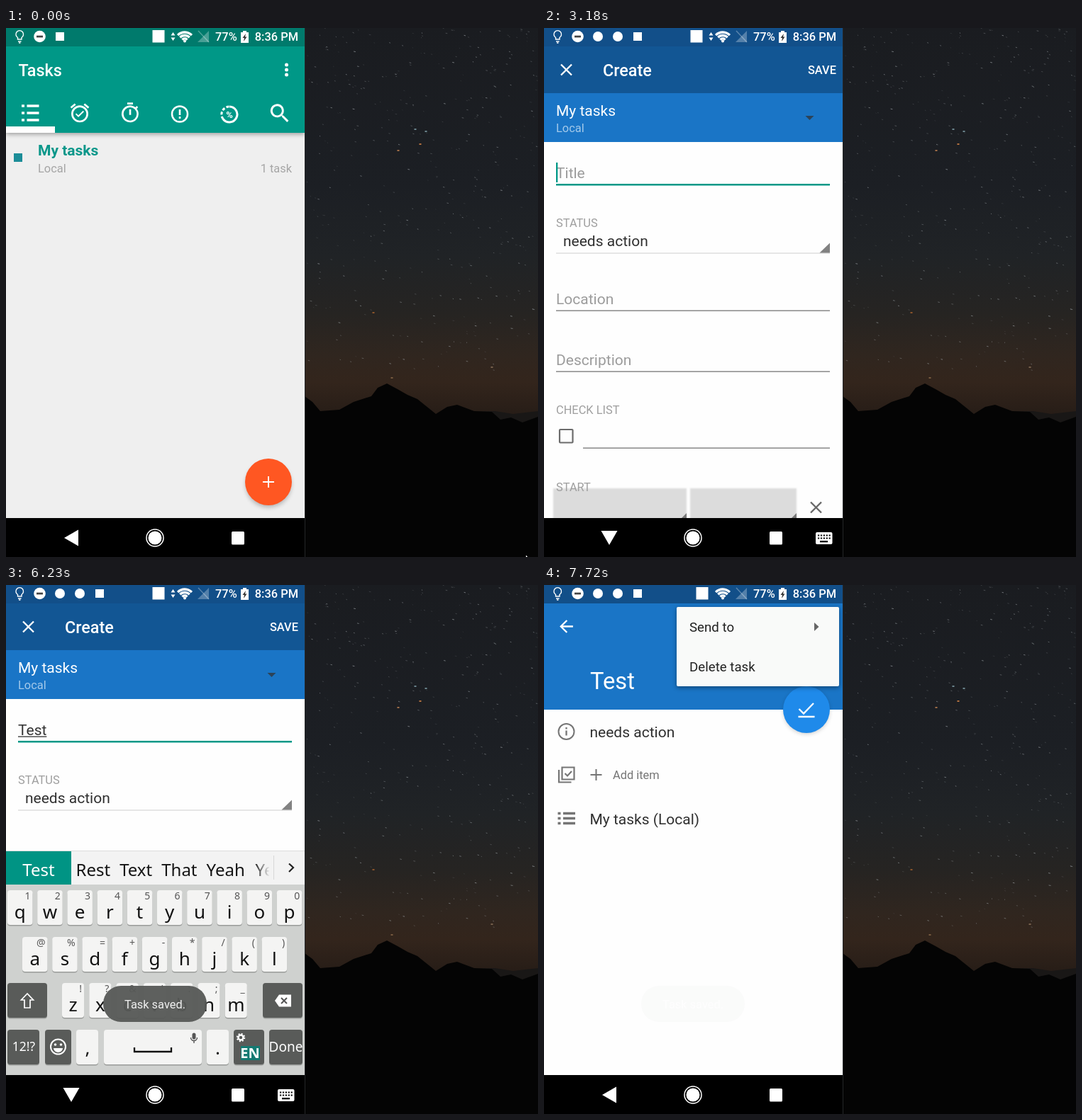
Recreate the animation shown at these times as an HTML page. Size 750x747 px, loop 8000 ms.

```html
<!DOCTYPE html>
<html lang="en">
<head>
<meta charset="utf-8">
<title>Creating a task</title>
<style>
html, body { margin: 0; height: 100%; overflow: hidden; background: #000; }
svg { display: block; width: 100vw; height: 100vh; }
text { font-family: Roboto, sans-serif; white-space: pre; }
.key text, #strip text { font-family: "Noto Sans", "Open Sans", sans-serif; }
.upper .letter { text-transform: uppercase; }
</style>
</head>
<body>
<svg id="stage" viewBox="0 0 750 747" preserveAspectRatio="none"></svg>
<script>
const LOOP = 8000, BLUE = '#1a75c6', TEAL = '#009887', GREY = '#757575';

// Drawing helpers; text is placed by the middle of its capitals.
const rect = (x, y, w, h, fill, more = '') =>
  `<rect x="${x}" y="${y}" width="${w}" height="${h}" fill="${fill}" ${more}/>`;
const circle = (x, y, r, fill, more = '') =>
  `<circle cx="${x}" cy="${y}" r="${r}" fill="${fill}" ${more}/>`;
const text = (x, y, s, size, fill, more = '') =>
  `<text x="${x}" y="${y + .356 * size}" font-size="${size}" fill="${fill}" ${more}>${s}</text>`;
const shape = (d, fill, more = '') => `<path d="${d}" fill="${fill}" ${more}/>`;
const line = (d, color, width = 2, more = '') =>
  `<path d="${d}" fill="none" stroke="${color}" stroke-width="${width}" ${more}/>`;
const group = (id, content, more = '') => `<g id="${id}" ${more}>${content}</g>`;
const icon = (x, y, scale, d, fill = '#fff') =>
  shape(d, fill, `transform="translate(${x} ${y}) scale(${scale}) translate(-12 -12)"`);
const MEDIUM = 'font-weight="500" ', BOLD = 'font-weight="700" ', MID = 'text-anchor="middle" ', END = 'text-anchor="end" ';

const cross = (x, y, r, color) =>
  line(`M${x - r} ${y - r}l${2 * r} ${2 * r}m0 ${-2 * r}l${-2 * r} ${2 * r}`, color, 2.3);
const plus = (x, y, r, color, w = 2) => line(`M${x - r} ${y}h${2 * r}M${x} ${y - r}v${2 * r}`, color, w);
const dots = (x, y) => [-7, 0, 7].map(d => circle(x, y + d, 2.5, '#fff')).join('');
const bullets = (x, y, gap, color) => [-gap, 0, gap].map(d =>
  line(`M${x - 12} ${y + d}h4m3.5 0h17`, color, 3.5)).join('');

const ICONS = {
  alarm: 'M22 5.7l-4.6-3.9-1.3 1.6 4.6 3.9zM7.9 3.4L6.6 1.9 2 5.7l1.3 1.5zM12 4a9 9 0 1 0 0 18a9 9 0 1 0 0-18zm0 16a7 7 0 1 1 0-14a7 7 0 1 1 0 14zm-1.5-5.5L8.4 12.4l-1 1 3.1 3.2 6-6-1-1z',
  timer: 'M15 1H9v2h6zM11 14h2V8h-2zM19 7.4L20.45 6 19 4.56 17.62 6A9 9 0 1 0 19 7.4zM12 20a7 7 0 1 1 0-14a7 7 0 1 1 0 14z',
  search: 'M15.5 14h-.8l-.3-.3A6.5 6.5 0 1 0 13.7 14.4l.3.3v.8l5 5L20.5 19zM9.5 14a4.5 4.5 0 1 1 0-9a4.5 4.5 0 1 1 0 9z',
  back: 'M20 11H7.83l5.59-5.59L12 4l-8 8 8 8 1.41-1.41L7.83 13H20z',
  pin: 'M16 12V4h1V2H7v2h1v8l-2 2v2h5.2v6h1.6v-6H18v-2z',
  pencil: 'M3 17.25V21h3.75L17.81 9.94l-3.75-3.75zM20.71 7.04a1 1 0 0 0 0-1.41l-2.34-2.34a1 1 0 0 0-1.41 0l-1.83 1.83 3.75 3.75z'
};

function sky() {
  let seed = 7, stars = '';
  const rnd = () => (seed = seed * 16807 % 2147483647) / 2147483647;
  for (let i = 0; i < 400; i++) {
    const x = 424 + rnd() * 325, y = 490 * rnd() ** 1.25;
    stars += line(`M${x.toFixed(1)} ${y.toFixed(1)}l${(1 + rnd() * 1.8).toFixed(1)} .6`,
      '#aab0b4', 1, `opacity="${(.12 + .5 * rnd() ** 2).toFixed(2)}"`);
  }
  const bright = [[584, 164, '#d98546'], [553, 173, '#c08050'], [577, 143, '#7f9fa8'], [592, 146, '#7f9fa8'],
    [518, 402, '#a5602c'], [544, 494, '#8a6848'], [685, 479, '#8a7058']];
  return rect(421, 0, 329, 747, 'url(#night)') + stars +
    bright.map(([x, y, c]) => line(`M${x - 1.5} ${y}h3`, c, 1.6)).join('') +
    shape('M640 542L690 541 715 545 750 541V570H640z', '#191716') +
    shape('M421 520L432 528 443 541 470 539 490 528 515 520 524 508 537 502 552 510 566 518 580 524 606 545 ' +
      '622 535 636 532 660 541 685 542 697 553 712 550 728 557 750 549V747H421z', '#040404') +
    rect(421, 0, 1, 747, '#242628');
}

function statusIcons() {
  const wifi = [14, 9.5, 5].map(r => {
    const d = r * .707;
    return line(`M${252 - d} ${20 - d}A${r} ${r} 0 0 1 ${252 + d} ${20 - d}`, '#fff', 3.3);
  }).join('');
  return line('M16.5 16v-2.5a5.3 5.3 0 1 1 5.5 0V16zM17 19h4.5M18 21h2.5', '#fff', 1.4) +
    circle(47.5, 12, 8.3, '#fff') + rect(43, 10.7, 9, 2.7, '#444') +
    group('notices', circle(76, 12, 7, '#fff') + circle(104, 12, 7, '#fff')) +
    group('plug', rect(70, 6, 12, 12, '#fff')) +
    group('chip', rect(206.5, 3, 17, 17.5, '#fff')) +
    group('arrows', shape('M232.5 10.5h6l-3-4.5zM232.5 13.5h6l-3 4.5z', '#fff')) +
    wifi + circle(252, 18.5, 2, '#fff') +
    shape('M286 4V20H270z', '#fff', 'opacity=".28"') + line('M271 4l15 16', '#fff', 1.5, 'opacity=".3"') +
    text(295, 12.5, '77%', 16.4, '#fff', MEDIUM) +
    shape('M331 6h3V4h5v2h3v15h-11z', '#fff') + shape('M338 8l-4.5 6h2.5l-1 5 4.5-6.5h-2.5z', '#333') +
    text(412, 12.5, '8:36 PM', 16.4, '#fff', MEDIUM + END);
}

function listScreen() {
  return rect(0, 26, 421, 666, '#efefef') +
    rect(0, 140, 421, 10, '#000', 'opacity=".35" filter="url(#soft)"') +
    rect(0, 26, 421, 122, TEAL) + rect(0, 139, 69, 9, '#fff') +
    text(17.5, 60, 'Tasks', 23.4, '#fff', MEDIUM) + dots(395.5, 59) +
    bullets(34, 120, 10, '#fff') +
    icon(104, 120, 1.33, ICONS.alarm) + icon(175, 120, 1.33, ICONS.timer) +
    circle(245, 121.5, 11, 'none', 'stroke="#fff" stroke-width="2.5"') +
    line('M245 115v8m0 2v3', '#fff', 2.6) +
    line('M315 111a11 11 0 1 1-9 17.5', '#fff', 3) +
    line('M306 128.5a11 11 0 0 1 9-17.5', '#fff', 3, 'stroke-dasharray="4 2.5"') +
    text(315, 122, '%', 13, '#fff', BOLD + MID) +
    icon(386, 120.5, 1.46, ICONS.search) +
    rect(11, 177, 12, 12, '#1c8d98') +
    text(45, 173, 'My tasks', 21, '#0b978a', BOLD) +
    text(45, 198, 'Local', 16.4, '#a5a5a5') + text(403, 198, '1 task', 16.4, '#a5a5a5', END) +
    circle(370, 645, 32, '#000', 'opacity=".25" filter="url(#soft)"') +
    circle(370, 641, 33, '#ff5722') + circle(370, 641, 33, '#fff', 'id="ripple"') +
    plus(370, 641, 8, '#fff', 1.8);
}

function createScreen() {
  const field = (label, y) => text(17, y, label, 21, '#9c9c9c') + rect(17, y + 15.5, 386, 1.3, '#777');
  const caption = (label, y) => text(17, y, label, 16.4, '#9f9f9f');
  return rect(0, 26, 421, 700, '#fefefe') + rect(0, 26, 421, 66, '#bcbebc') +
    group('tint',
      rect(0, 26, 421, 66, '#125694') + rect(0, 92, 421, 69, BLUE) +
      rect(363, 31, 58, 56, '#fff', 'id="savePress"') +
      text(17, 116.5, 'My tasks', 21, '#fff') + text(17, 141.5, 'Local', 16.4, '#a3c9ea') +
      text(412, 59.5, 'SAVE', 16.4, '#fff', MEDIUM + END)) +
    cross(31.5, 59, 7.5, '#fff') + text(83, 60, 'Create', 23.4, '#fff', MEDIUM) +
    shape('M368.5 124h12l-6 6z', '#333', 'opacity=".75"') +
    text(17, 205, 'Title', 21, '#9c9c9c', 'id="hint"') +
    text(17, 205, '', 21, '#333', 'id="title"') + rect(17, 213.5, 0, 1.3, '#333', 'id="compose"') +
    rect(17, 190, 2.3, 28, TEAL, 'id="caret"') + rect(17, 220, 386, 2.5, TEAL) +
    caption('STATUS', 275.5) + text(27, 300.5, 'needs action', 21, '#303030') +
    rect(17, 317.5, 386, 1, '#d0d0d0') + shape('M388.5 317.5L403 303.5V317.5z', '#828282') +
    field('Location', 383) + field('Description', 469) + caption('CHECK LIST', 539.5) +
    rect(22, 567, 18.5, 18.5, 'none', 'stroke="#6b6b6b" stroke-width="2.2" rx="1"') +
    rect(55, 592.5, 348, 1.3, '#777') +
    [[13, 188], [206, 150]].map(([x, w]) =>
      rect(x, 650, w, 60, '#dcdcdc', 'filter="url(#slight)"') +
      shape(`M${x + w - 7} 692h7v-7z`, '#777')).join('') +
    caption('START', 648) + cross(383.5, 677, 7.5, '#666');
}

function detailScreen() {
  return rect(0, 26, 421, 700, '#fefefe') + rect(0, 26, 421, 150, BLUE) +
    icon(31.5, 58.5, 1.17, ICONS.back) + icon(290, 58, 1.17, ICONS.pin) +
    icon(346, 59, 1.3, ICONS.pencil) + dots(395.5, 59) +
    text(65, 135.5, 'Test', 32.7, '#fff') +
    circle(370, 178, 32, '#000', 'opacity=".22" filter="url(#soft)"') + circle(370, 176, 33, '#1f8aea') +
    line('M359.5 175l6.5 6.5L380 167M358.5 186h23', '#fff', 2.3) +
    circle(31.5, 207, 11, 'none', `stroke="${GREY}" stroke-width="2"`) +
    line('M31.5 201v2.5m0 2v7', GREY, 2.3) +
    line('M21 261v17.500h17.500M25.500 257.500h17v17h-17zM29.500 266l3.500 3.500 6-6.500', GREY, 2.2) +
    bullets(31.5, 329.5, 7, GREY) +
    text(64.5, 208, 'needs action', 21, '#303030') +
    plus(73.5, 268, 8, GREY) + text(97, 268.5, 'Add item', 16.4, '#757575') +
    text(64.5, 330.5, 'My tasks (Local)', 21, '#303030');
}

function keyboard() {
  const key = (x, y, w, content, dark) => `<g class="key">` +
    rect(x, y + 2, w, 48.5, '#9a9c9a', 'rx="4"') +
    rect(x, y, w, 49, dark ? '#595b59' : '#f4f4f3', 'rx="4"') + content + '</g>';
  const row = (letters, hints, x0, y, pitch, w) => [...letters].map((c, i) => {
    const x = x0 + i * pitch;
    return key(x, y, w,
      rect(x, y, w, 49, '#000', `rx="4" id="press-${c}" opacity="0"`) +
      `<text class="letter" x="${x + w / 2}" y="${y + 40}" font-size="26" fill="#111" ${MID}>${c}</text>` +
      text(x + w - 3, y + 8.5, hints[i].replace('&', '&amp;'), 14, '#555', END));
  }).join('');
  const label = (x, y, s, size, more = '') => text(x, y, s, size, '#fff', MID + more);
  return rect(0, 375, 421, 318, '#cfd1cf') + rect(0, 375, 421, 48, '#f3f3f3') + rect(0, 375, 421, 1, '#ddd') +
    group('strip', rect(0, 376, 92, 47, '#009484', 'id="cell"') +
      text(46, 402, '', 24, '#fff', MID + 'id="word"') + text(99, 402, '', 24, '#151515', 'id="others"')) +
    rect(350, 377, 22, 45, 'url(#fade)') + rect(371, 377, 50, 45, '#f3f3f3') +
    rect(377, 382, 1, 34, '#d8d8d8') + line('M399 393.5l6 5.5-6 6', '#222', 2.2) +
    row('qwertyuiop', '1234567890', 2, 431, 42.2, 35.5) +
    row('asdfghjkl', '@%=+-*/()', 23, 497, 42.2, 35.5) +
    row('zxcvbnm', "!?&':;_", 79, 562, 38.3, 31) +
    key(2, 562, 56, line('M30 577l-8.5 9h4.5v11h8v-11h4.5z', '#fff', 1.7), 1) +
    key(362, 562, 56, shape('M379 587l6-8.5h17v17h-17z', '#fff') + line('M388 583l8 8m0-8l-8 8', '#555', 2), 1) +
    key(2, 628, 45, label(25, 652, '12!?', 17.5), 1) +
    key(55, 628, 37, circle(73.5, 652, 10.5, 'none', 'stroke="#fff" stroke-width="2"') +
      circle(69.5, 649, 1.8, '#fff') + circle(77.5, 649, 1.8, '#fff') + shape('M67 654h13a6.5 6 0 0 1-13 0z', '#fff'), 1) +
    key(99, 628, 31, text(115, 653.5, ',', 26, '#111', MID)) +
    key(138, 628, 138, line('M181 653v6h52v-6', '#111', 2.3) +
      line('M265 635v4', '#555', 5, 'stroke-linecap="round"') + line('M260.5 639a4.5 4.5 0 0 0 9 0M265 643v4', '#555', 1.4)) +
    key(283, 628, 31, text(298.5, 653.5, '.', 26, '#111', MID)) +
    key(321, 628, 43, rect(331, 651, 27, 20, '#147a72') + label(344, 661, 'EN', 20, 'font-weight="600"') +
      circle(331, 639, 3.5, 'none', 'stroke="#fff" stroke-width="2.5"') +
      circle(331, 639, 5.2, 'none', 'stroke="#fff" stroke-width="2" stroke-dasharray="2 2.08"'), 1) +
    key(371, 628, 47, label(394.5, 652.5, 'Done', 19), 1);
}

const menu = rect(187, 33, 229, 112, '#000', 'opacity=".4" filter="url(#soft)"') +
  rect(187, 31, 229, 112, '#f9faf9', 'rx="2"') +
  text(205, 59.5, 'Send to', 18.7, '#222') + text(205, 115.5, 'Delete task', 18.7, '#222') +
  shape('M381 53l6.5 6-6.5 6z', '#666');
const toast = rect(137, 566, 146, 51, '#575957', 'rx="25" opacity=".95"') +
  text(210, 592, 'Task saved.', 16.4, '#f0f0f0', MID);
const navBar = rect(0, 692, 421, 55, '#000') +
  shape('M82 720l20-11.5v23z', '#fff', 'id="backKey"') +
  circle(210, 720, 9.5, '#fff') + circle(210, 720, 12, 'none', 'stroke="#fff" stroke-width="1.5"') +
  rect(318, 711, 18, 18.5, '#fff', 'rx="1.5"') +
  group('keysKey', rect(383, 712, 23.5, 17, '#fff', 'rx="2"') +
    line('M386 716.5h18M386 720.5h18', '#000', 2.2, 'stroke-dasharray="2.2 1.7"') + rect(389, 724, 11, 2.3, '#000'));

const stops = [[0, '#1a1c20'], [.3, '#1c1f24'], [.43, '#202326'], [.54, '#262422'], [.62, '#30261f'], [.67, '#33251c'], [.73, '#271d17']];
stage.innerHTML = `<defs>
  <linearGradient id="night" x2="0" y2="1">${stops.map(([o, c]) => `<stop offset="${o}" stop-color="${c}"/>`).join('')}</linearGradient>
  <linearGradient id="fade"><stop stop-color="#f3f3f3" stop-opacity="0"/><stop offset="1" stop-color="#f3f3f3"/></linearGradient>
  <filter id="soft" x="-20%" y="-100%" width="140%" height="300%"><feGaussianBlur stdDeviation="3"/></filter>
  <filter id="slight"><feGaussianBlur stdDeviation="1"/></filter></defs>` +
  group('list', listScreen()) + group('create', createScreen()) + group('detail', detailScreen()) +
  rect(0, 0, 421, 26, '#007a6c') + rect(0, 0, 421, 26, '#afb1af', 'id="greyBar"') + rect(0, 0, 421, 26, '#124f89', 'id="blueBar"') +
  statusIcons() + group('keyboard', keyboard()) + group('menu', menu) + group('toast', toast) + navBar + sky() +
  shape('M733 744.5l2.5 2.5h-2.5z', '#fff', 'id="pointer"');

const $ = id => document.getElementById(id);
const set = (id, name, value) => $(id).setAttribute(name, value);
const alpha = (id, a) => { set(id, 'opacity', a); set(id, 'visibility', +a ? 'visible' : 'hidden'); };
const move = (id, x, y) => set(id, 'transform', `translate(${x} ${y})`);
const span = (t, a, b) => Math.min(1, Math.max(0, (t - a) / (b - a)));
const easeOut = p => 1 - (1 - p) ** 3;

// Each keystroke: time, key, text so far, other suggestions.
const strokes = [
  [4000, 't', 'T', 'The Test To That Thank'],
  [4530, 'e', 'Te', 'Test The Text Tell Yes'],
  [4770, 's', 'Tes', 'Test Yes Rest Text Tell'],
  [4980, 't', 'Test', 'Rest Text That Yeah Yes']
];
let shown = null;

// Words are centred in padded cells that have a minimum width.
function suggest(words) {
  $('others').innerHTML = words.split(' ').map(w => `<tspan>${w}</tspan>`).join('');
  let left = 92;
  const widths = [...$('others').children].map(w => w.getComputedTextLength());
  widths.forEach((width, i) => {
    const cell = Math.max(54, width + 13);
    $('others').children[i].setAttribute('x', left + (cell - width) / 2);
    left += cell;
  });
}

function type(t) {
  const done = strokes.filter(s => t >= s[0]);
  const [, , word, others] = done[done.length - 1] || [0, '', '', ''];
  for (const c of 'tes')
    set('press-' + c, 'opacity', strokes.some(s => s[1] === c && t >= s[0] - 70 && t < s[0] + 70) ? .18 : 0);
  if (word === shown) return;
  shown = word;
  $('title').textContent = $('word').textContent = word;
  suggest(others);
  const width = word ? $('title').getComputedTextLength() : 0;
  set('compose', 'width', width);
  set('caret', 'x', 17 + width);
  alpha('cell', word ? 1 : 0);
  set('hint', 'opacity', word ? 0 : 1);
  set('keyboard', 'class', word ? '' : 'upper');
}

function draw(now) {
  const t = now % LOOP, on = (a, b) => t >= a && t < b ? 1 : 0;
  alpha('pointer', on(0, 70));
  alpha('ripple', .3 * span(t, 1620, 1760) * (1 - span(t, 1800, 2000)));

  const open = span(t, 1830, 2240), tint = span(t, 2200, 2400), detail = span(t, 6440, 6620);
  set('create', 'opacity', span(t, 1830, 2040));
  move('create', 0, t < 2240 ? Math.max(1, 55 * (1 - easeOut(open))) : 0);
  set('tint', 'opacity', tint);
  alpha('greyBar', span(t, 1830, 2040));
  alpha('blueBar', tint);
  alpha('detail', detail);
  move('detail', 0, 50 * (1 - easeOut(detail)));

  type(t);
  set('caret', 'opacity', on(0, 2790) || on(3100, 3660) || on(3900, 5530));
  set('savePress', 'opacity', .2 * on(5370, 5770));

  set('keyboard', 'opacity', on(3230, 6960));
  move('keyboard', 0, t < 6000 ? 317 * (1 - easeOut(span(t, 3230, 3570))) : 317 * span(t, 6610, 6950) ** 2);
  const imeNav = on(2900, 6500);
  set('backKey', 'transform', imeNav ? 'rotate(-90 92 720)' : '');
  alpha('keysKey', imeNav);

  const noticed = on(2790, LOOP), quiet = on(7100, LOOP);
  alpha('notices', noticed);
  move('plug', noticed ? 56 : 0, 0);
  move('chip', quiet ? 8 : 0, 0);
  alpha('arrows', 1 - quiet);

  alpha('toast', span(t, 5740, 6090) * (1 - .98 * span(t, 7400, 7720)));
  const pop = easeOut(span(t, 7330, 7600));
  alpha('menu', pop);
  set('menu', 'transform', `translate(416 31) scale(${.6 + .4 * pop} ${.3 + .7 * pop}) translate(-416 -31)`);
}

const start = performance.now();
(function frame() {
  draw(performance.now() - start);
  requestAnimationFrame(frame);
})();
</script>
</body>
</html>
```
